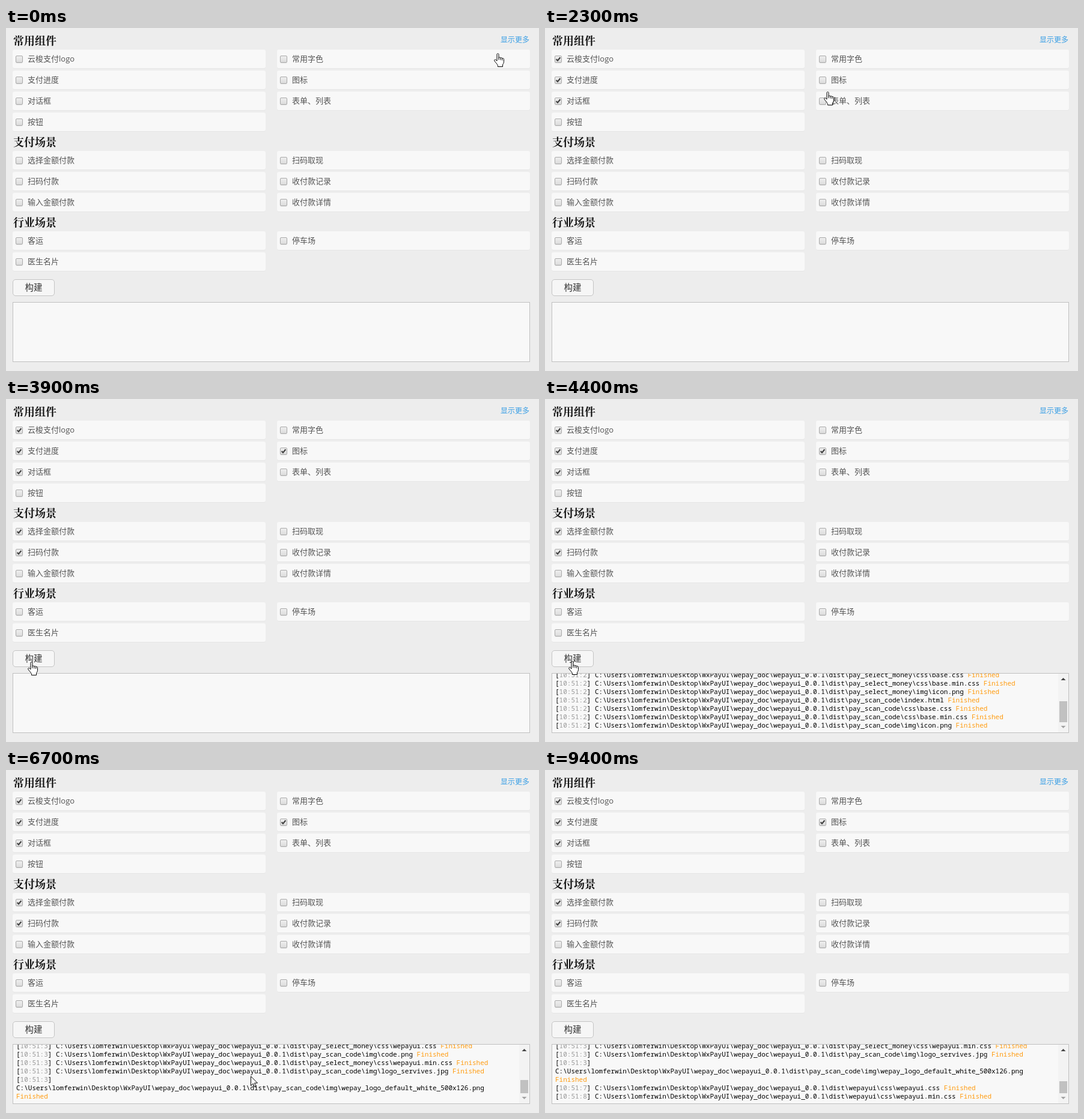
These frames come from a looping animation (887x572 px, 9.8 s). An HTML page:

```html
<!DOCTYPE html>
<html lang="zh-CN">
<head>
<meta charset="utf-8">
<title>构建</title>
<style>
html, body { margin: 0; width: 100%; height: 100%; overflow: hidden; background: #ededed; }
#stage { position: absolute; left: 0; top: 0; width: 887px; height: 572px; overflow: hidden;
  background: #ededed; font-family: "Open Sans", "Noto Sans CJK SC", sans-serif; }
#stage * { position: absolute; box-sizing: border-box; white-space: pre; }
h2 { left: 12px; margin: 0; font: bold 18px/24px "Noto Serif CJK SC", "Noto Sans CJK SC", serif; color: #111; }
.more { left: 823px; top: 10px; font-size: 12px; line-height: 20px; color: #3a9fe5; }
.row { width: 421px; height: 31px; border-radius: 3px; background: #f8f8f8;
  box-shadow: 0 1px 1px rgba(0,0,0,.03); font-size: 13px; line-height: 31px; color: #555; }
.row span { left: 25px; }
.box { left: 5px; top: 10px; width: 12px; height: 12px; border: 1px solid #a9a9a9; border-radius: 2px;
  background: linear-gradient(#eee, #dcdcdc); box-shadow: 0 1px 1px rgba(0,0,0,.08); }
.box svg { left: 0; top: 0; width: 10px; height: 10px; visibility: hidden; }
.on svg { visibility: visible; }
#build { left: 11px; top: 419px; width: 70px; height: 28px; border: 1px solid #c4c4c4; border-radius: 5px;
  background: #f6f6f6; font-size: 14.5px; line-height: 26px; text-align: center; color: #333; }
#build.down { background: #e4e4e4; }
#log { left: 11px; top: 457px; width: 861px; height: 100px; border: 1px solid #c0c0c0;
  background: #f8f8f8; overflow: hidden; }
#lines { left: 5px; top: 5px; }
#lines div { left: 0; height: 14px; font: 11px/14px "Noto Sans Mono", monospace; color: #000; }
#lines span { position: static; }
.time { color: #999; }
.done { color: #ff9c12; }
#bar { right: 0; top: 0; width: 17px; height: 98px; background: #f3f3f3; }
#thumb { left: 2px; width: 13px; background: #c1c1c1; }
#bar svg { left: 0; top: 0; }
#cursor { left: 0; top: 0; width: 20px; height: 24px; }
#cursor svg { left: 0; top: 0; overflow: visible; visibility: hidden; }
#cursor svg.show { visibility: visible; }
</style>
</head>
<body>
<div id="stage">
  <div class="more">显示更多</div>
  <div id="build">构建</div>
  <div id="log">
    <div id="lines"></div>
    <div id="bar">
      <svg width="17" height="98"><path d="M4.5 11L8.5 7L12.5 11Z" fill="#444"/><path d="M4.5 87L8.5 91L12.5 87Z" fill="#a3a3a3"/></svg>
      <div id="thumb"></div>
    </div>
  </div>
  <div id="cursor">
    <svg data-kind="hand" width="18" height="24" fill="none" stroke="#000" stroke-linejoin="round">
      <path fill="#fff" d="M5 13V2.2C5 0 8 0 8 2.2V8C8 6.6 11 6.4 11 8.4C11 7 13.8 7 13.8 9.2C13.8 8 16.5 8 16.5 10.4V14.5C16.5 17 14.5 18 14.5 20V22.5H6.5V20.5C5.5 18 2.6 15.5 .9 12.8C0 11 2.2 9.8 3.4 11.2Z"/>
      <path d="M8 8V11M11 8.4V11.5M13.8 9.2V12"/>
    </svg>
    <svg data-kind="arrow" width="13" height="20" stroke="#000">
      <path fill="#fff" d="M.5 .8V16.5L4.2 13L6.7 18.5L9 17.5L6.6 12H11.5Z"/>
    </svg>
    <svg data-kind="beam" width="8" height="16" fill="none" stroke="#000">
      <path d="M0 .5H3L3.5 1L4 .5H7M3.5 1V15M0 15.5H3L3.5 15L4 15.5H7"/>
    </svg>
  </div>
</div>
<script>
const LOOP = 9800, TICK = 100;
const $ = id => document.getElementById(id);
const stage = $('stage');

function add(parent, tag, cls, html) {
  const el = document.createElement(tag);
  el.className = cls;
  el.innerHTML = html;
  parent.appendChild(el);
  return el;
}

const sections = [
  ['常用组件', 8, ['云梭支付logo', '支付进度', '对话框', '按钮'], ['常用字色', '图标', '表单、列表']],
  ['支付场景', 177, ['选择金额付款', '扫码付款', '输入金额付款'], ['扫码取现', '收付款记录', '收付款详情']],
  ['行业场景', 311, ['客运', '医生名片'], ['停车场']]
];
const tick = '<div class="box"><svg viewBox="0 0 10 10"><path d="M1.6 5L4 7.5L8.4 2" fill="none" stroke="#404040" stroke-width="2.1"/></svg></div>';
const rows = {};
for (const [title, y, ...cols] of sections) {
  add(stage, 'h2', '', title).style.top = y + 'px';
  cols.forEach((col, c) => col.forEach((name, i) => {
    const row = rows[name] = add(stage, 'div', 'row', `${tick}<span>${name}</span>`);
    row.style.left = (c ? 451 : 11) + 'px';
    row.style.top = y + 28 + i * 35 + 'px';
  }));
}
stage.appendChild($('cursor'));

// tick at which each option becomes checked
const checks = { '云梭支付logo': 6, '支付进度': 10, '对话框': 16, '图标': 26, '选择金额付款': 31, '扫码付款': 33 };

const root = 'C:\\Users\\lomferwin\\Desktop\\WxPayUI\\wepay_doc\\wepayui_0.0.1\\dist\\';
const stamp = s => `[<span class="time">10:51:${s}</span>]`;
const done = '<span class="done">Finished</span>';
const entry = (s, path) => `${stamp(s)} ${root}${path} ${done}`;
const lines = [];
for (const dir of ['wepayui', 'pay_select_money', 'pay_scan_code'])
  for (const file of ['index.html', 'css\\base.css', 'css\\base.min.css', 'img\\icon.png'])
    lines.push(entry(2, dir + '\\' + file));
lines.push(
  entry(3, 'pay_select_money\\index.html'),
  entry(3, 'pay_select_money\\css\\wepayui.css'),
  entry(3, 'pay_scan_code\\img\\code.png'),
  entry(3, 'pay_select_money\\css\\wepayui.min.css'),
  entry(3, 'pay_scan_code\\img\\logo_servives.jpg'),
  stamp(3),
  root + 'pay_scan_code\\img\\wepay_logo_default_white_500x126.png',
  done,
  entry(7, 'wepayui\\css\\wepayui.css'),
  entry(8, 'wepayui\\css\\wepayui.min.css')
);
const lineEls = lines.map((html, i) => {
  const el = add($('lines'), 'div', '', html);
  el.style.top = i * 14 + 'px';
  return el;
});

// [tick, value] steps
const counts = [[0, 0], [43, 4], [44, 12], [45, 20], [80, 21], [84, 22]];
const kinds = [[0, 'hand'], [35, 'beam'], [36, 'hand'], [37, 'arrow'], [38, 'hand'], [59, 'arrow'], [92, 'hand'], [93, 'arrow']];
const stepAt = (list, n) => list.filter(s => s[0] <= n).pop()[1];

// [tick, x, y] pointer path
const path = [
  [0, 812, 42], [1, 690, 45], [3, 130, 49], [4, 40, 49], [6, 40, 49], [10, 49, 86], [14, 42, 121], [15, 40, 125],
  [18, 110, 154], [21, 340, 142], [23, 464, 106], [25, 487, 84], [26, 487, 86], [28, 330, 150],
  [30, 60, 214], [31, 48, 222], [34, 46, 280], [35, 46, 327], [36, 43, 356], [38, 38, 445], [39, 36, 438],
  [40, 39, 437], [57, 39, 437], [58, 38, 434], [59, 60, 440], [61, 280, 490], [64, 532, 512], [67, 407, 510],
  [70, 529, 518], [72, 529, 518], [73, 524, 516], [87, 524, 516], [88, 530, 529], [90, 650, 460],
  [93, 872, 127], [94, 900, 100]
];
function pointAt(n) {
  const i = path.findIndex(p => p[0] > n);
  if (i < 0) return path[path.length - 1].slice(1);
  const a = path[i - 1], b = path[i], k = (n - a[0]) / (b[0] - a[0]);
  return [1, 2].map(j => Math.round(a[j] + (b[j] - a[j]) * k));
}

const icons = [...document.querySelectorAll('[data-kind]')];
let last = -1;
function draw(n) {
  const [x, y] = pointAt(n), kind = stepAt(kinds, n);
  $('cursor').style.transform = `translate(${x}px, ${y}px)`;
  icons.forEach(el => el.classList.toggle('show', el.dataset.kind === kind));
  for (const name in checks) rows[name].classList.toggle('on', n >= checks[name]);
  $('build').classList.toggle('down', n === 42);

  const count = stepAt(counts, n), height = count * 14 + 10, full = height > 98;
  lineEls.forEach((el, i) => el.style.display = i < count ? 'block' : 'none');
  $('lines').style.transform = `translateY(${full ? 98 - height : 0}px)`;
  $('bar').style.display = full ? 'block' : 'none';
  const size = Math.round(98 / height * 64);
  $('thumb').style.height = size + 'px';
  $('thumb').style.top = 81 - size + 'px';
}
function loop() {
  const n = Math.floor(performance.now() % LOOP / TICK);
  if (n !== last) draw(last = n);
  requestAnimationFrame(loop);
}
loop();
</script>
</body>
</html>
```
